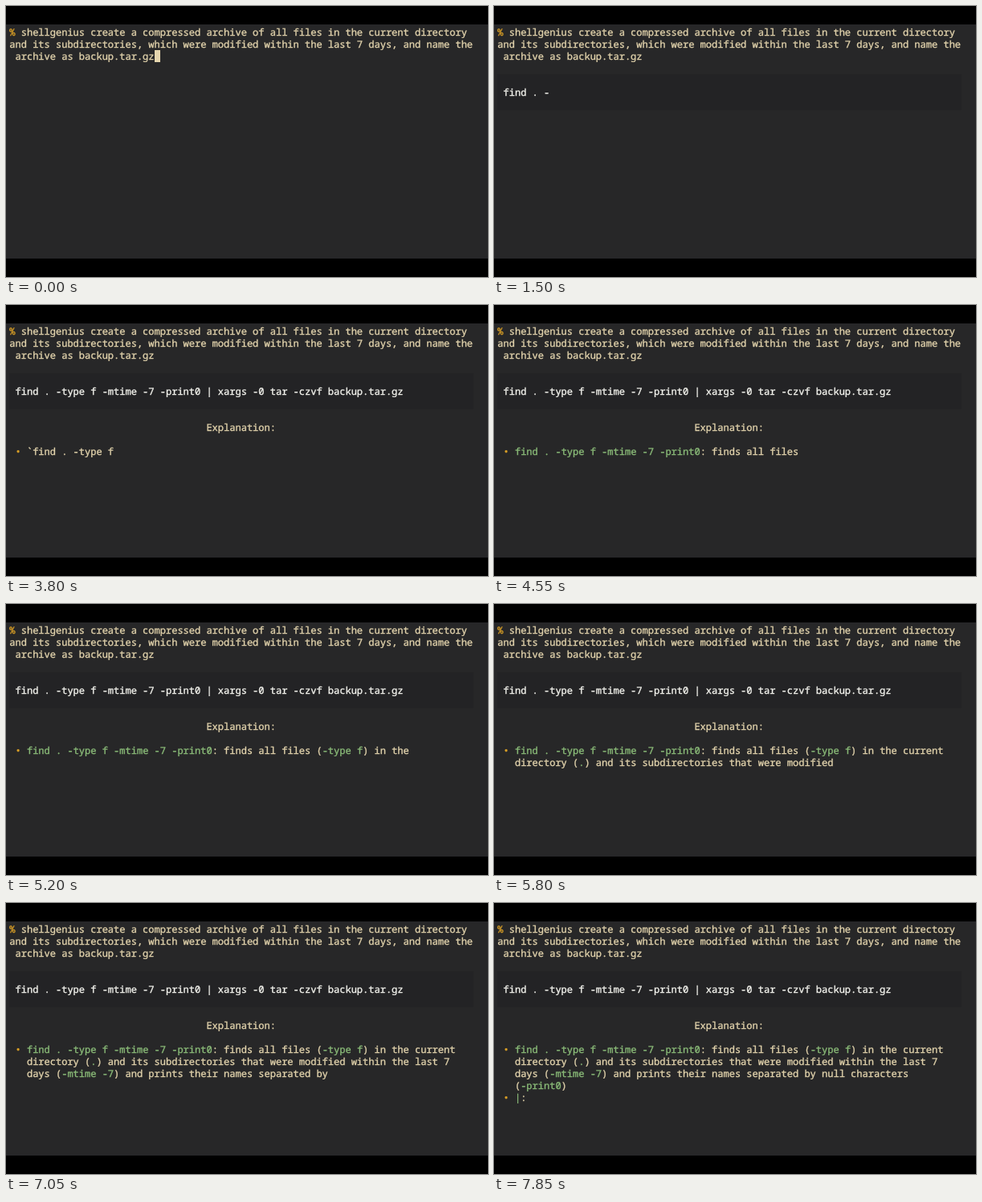
These frames come from a looping animation (600 px wide and 338 px high, 8000 ms). An HTML page:

```html
<!DOCTYPE html>
<html lang="en">
<head>
<meta charset="utf-8">
<title>Terminal session</title>
<style>
  html, body { margin: 0; width: 100%; height: 100%; overflow: hidden; background: #000; }
  #term { position: absolute; left: 0; top: 23px; width: 600px; height: 292px; background: #272728; }
  #panel { position: absolute; left: 4px; top: 62px; width: 578px; height: 45px; background: #232325; }
  #screen {
    position: absolute; left: 4.3px; top: 2px; margin: 0;
    font: 12.03px/15px "Noto Sans Mono", "DejaVu Sans Mono", monospace;
    font-variant-ligatures: none; text-rendering: geometricPrecision;
    -webkit-text-stroke: 0.35px currentColor;
    white-space: pre; color: #e2d3ac;
  }
  .mark { color: #dca126; }
  .code { color: #f4f4ee; }
  .lit { color: #8abb78; }
  #cursor { position: absolute; width: 1ch; height: 15px; background: #e6d6ae; }
</style>
</head>
<body>
<div id="term">
  <div id="panel"></div>
  <pre id="screen"><span id="text"></span><span id="cursor"></span></pre>
</div>
<script>
const LOOP = 8000;
const $ = id => document.getElementById(id);
const span = (cls, s) => `<span class="${cls}">${s}</span>`;

const prompt = [
  span('mark', '%') + ' shellgenius create a compressed archive of all files in the current directory',
  'and its subdirectories, which were modified within the last 7 days, and name the',
  ' archive as backup.tar.gz'
];

// Text streamed in at each refresh
const command = ['find . -', 'type f -mtime', ' -7 -print', '0 | xargs', ' -0 tar -', 'czvf backup.tar', '.gz'];
const notes = [
  '', '`find .', ' -type f', ' -mtime -', '7 -print0', '`: finds all files', ' (`-type f`)', ' in the',
  ' current directory (`', '.`) and its', ' subdirectories that were modified', ' within the last',
  ' 7 days (`', '-mtime -7', '`) and prints', ' their names separated by', ' null characters (`',
  '-print0`)', '\n`|`:'
];
const total = command.length + notes.length;

// Number of refreshes done by time t
function refreshes(t) {
  let n = 0;
  while (n < total && t >= Math.ceil((1495 + 252 * n) / 50) * 50) n++;
  return n;
}

// One bullet: closed backtick pairs become literals, then words wrap
function bullet(md) {
  const parts = md.split('`');
  if (parts.length % 2 === 0) parts.push(parts.splice(-2).join('`'));
  const plain = parts.join('');
  const lit = parts.flatMap((p, i) => Array(p.length).fill(i % 2));
  let pos = 0;
  return plain.match(/.{1,77}(?:\s|$)/g).map((line, row) => {
    let out = '', run = '';
    for (let i = 0; i < line.length; i++, pos++) {
      run += line[i];
      if (i === line.length - 1 || lit[pos] !== lit[pos + 1]) {
        out += lit[pos] ? span('lit', run) : run;
        run = '';
      }
    }
    return (row ? '   ' : ' ' + span('mark', '•') + ' ') + out;
  });
}

function draw(n) {
  const lines = [...prompt];
  if (n) lines.push('', '', ' ' + span('code', command.slice(0, n).join('')));
  const m = n - command.length;
  if (m > 0) lines.push('', '', ' '.repeat(34) + 'Explanation:');
  if (m > 1) lines.push('', ...notes.slice(0, m).join('').split('\n').flatMap(bullet));
  $('text').innerHTML = lines.join('\n');
  $('panel').style.display = n ? 'block' : 'none';
}

let shown = -1;
function tick() {
  const t = performance.now() % LOOP;
  const n = refreshes(t);
  if (n !== shown) draw(shown = n);
  const cur = $('cursor').style;
  cur.display = t < 500 ? 'block' : 'none';
  cur.left = t < 350 ? '25ch' : '0';
  cur.top = t < 350 ? '30px' : '45px';
  requestAnimationFrame(tick);
}
tick();
</script>
</body>
</html>
```
